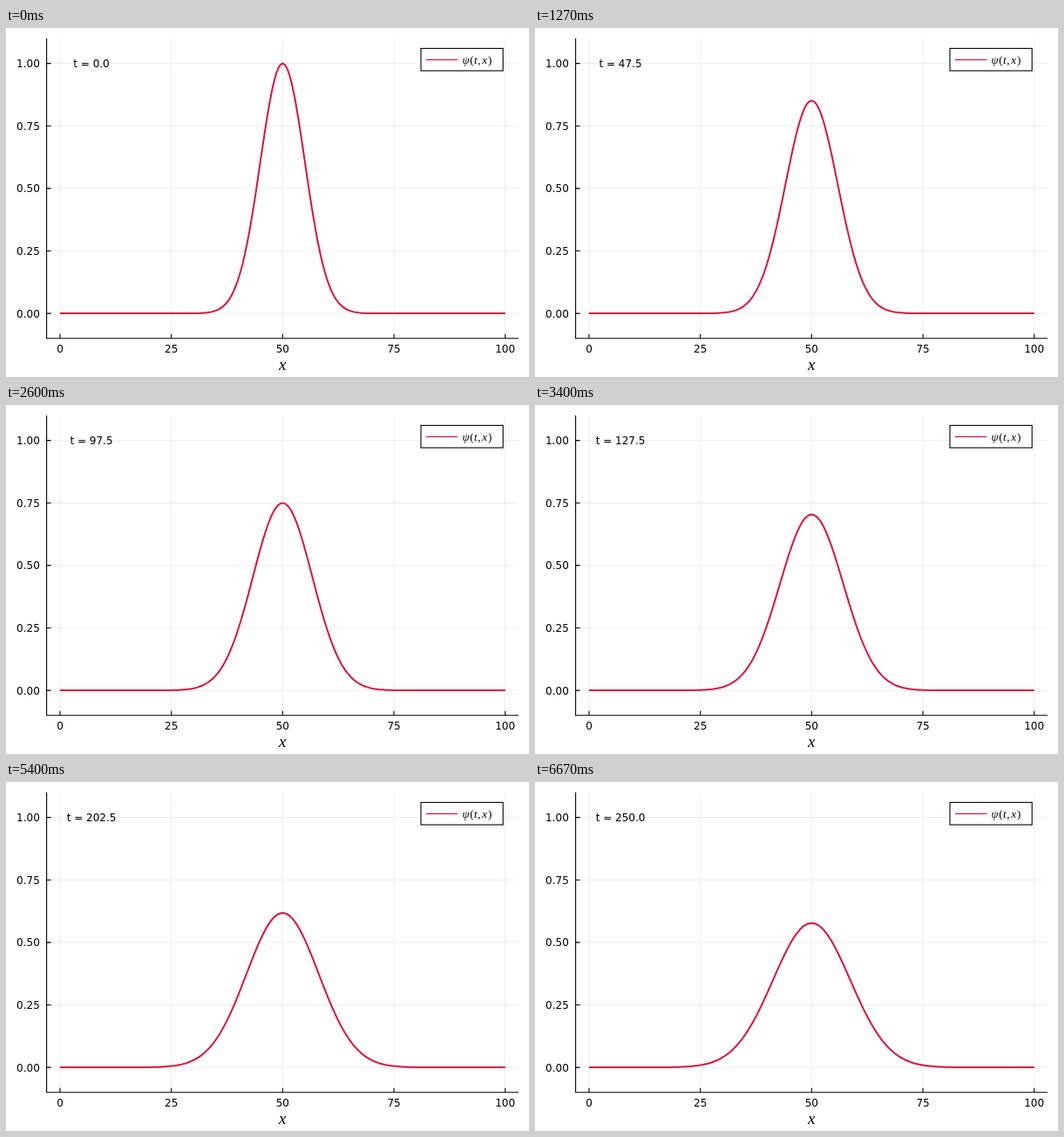
Write an HTML page that moves like this. It is 600 px wide and 400 px high and loops after 6740 ms.

```html
<!DOCTYPE html>
<html lang="en">
<head>
<meta charset="utf-8">
<title>Diffusing Gaussian</title>
<style>
  html, body { margin: 0; width: 100%; height: 100%; overflow: hidden; background: #fff; }
  svg { display: block; width: 600px; height: 400px; }
  text { font: 12px "DejaVu Sans", sans-serif; }
  .math { font: italic 13px "Liberation Serif", serif; }
  .roman { font-style: normal; }
  .label { font-size: 19px; }
  .middle { text-anchor: middle; }
  .end { text-anchor: end; }
  .grid { stroke: #000; stroke-opacity: .1; stroke-width: .7; }
  .axis { stroke: #000; stroke-width: 1.1; fill: none; }
  .curve { stroke: crimson; stroke-width: 2; stroke-linejoin: round; fill: none; }
</style>
</head>
<body>
<svg viewBox="0 0 600 400">
  <g id="axes"></g>
  <path class="axis" d="M46.6 12V355.7H588"/>
  <path id="curve" class="curve"/>
  <text id="clock" class="middle" x="98" y="45"></text>
  <text class="math label middle" x="317.2" y="392.3">x</text>
  <rect x="476" y="23.4" width="94.2" height="25.6" fill="#fff" stroke="#000" stroke-width="1.1"/>
  <path d="M482 36.4H518" stroke="crimson" stroke-width="1.1"/>
  <text class="math" y="41.3"><tspan x="523.5">ψ</tspan><tspan x="532.3" class="roman">(</tspan><tspan x="537">t</tspan><tspan x="541.3" class="roman">,</tspan><tspan x="546.2">x</tspan><tspan x="553" class="roman">)</tspan></text>
</svg>
<script>
const LOOP = 6740, TIME_STEP = 2.5, LAST_STEP = 100;
const DIFFUSION = 0.1, VARIANCE = 25, CENTER = 50;
const px = x => 62 + 5.107 * x;
const py = y => 327.1 - 286.5 * y;
const curve = document.getElementById('curve');
const clock = document.getElementById('clock');

let axes = '';
for (let i = 0; i <= 4; i++) {
  const x = px(25 * i), y = py(i / 4);
  axes += `<path class="grid" d="M${x} 12V355.7M46.6 ${y}H588"/>
    <path class="axis" d="M${x} 355.7v-5M46.6 ${y}h5"/>
    <text class="middle" x="${x}" y="372">${25 * i}</text>
    <text class="end" x="38.8" y="${y + 4.4}">${(i / 4).toFixed(2)}</text>`;
}
document.getElementById('axes').innerHTML = axes;

// Exact solution of the diffusion equation for a Gaussian start
function psi(t, x) {
  const variance = VARIANCE + 2 * DIFFUSION * t;
  return Math.sqrt(VARIANCE / variance) * Math.exp(-((x - CENTER) ** 2) / (2 * variance));
}

let shown = -1;
function draw(now) {
  // 15 steps per second, each rounded to a hundredth of a second
  const hundredths = Math.floor((now % LOOP) / 10);
  const step = Math.min(LAST_STEP, Math.floor((hundredths + 0.5) * 0.15));
  if (step !== shown) {
    shown = step;
    const t = step * TIME_STEP;
    const points = Array.from({ length: 201 }, (_, i) =>
      `${px(i / 2).toFixed(2)} ${py(psi(t, i / 2)).toFixed(2)}`);
    curve.setAttribute('d', 'M' + points.join('L'));
    clock.textContent = `t = ${t.toFixed(1)}`;
  }
}

let start;
function tick(now) {
  start ??= now;
  draw(now - start);
  requestAnimationFrame(tick);
}
draw(0);
requestAnimationFrame(tick);
</script>
</body>
</html>
```
